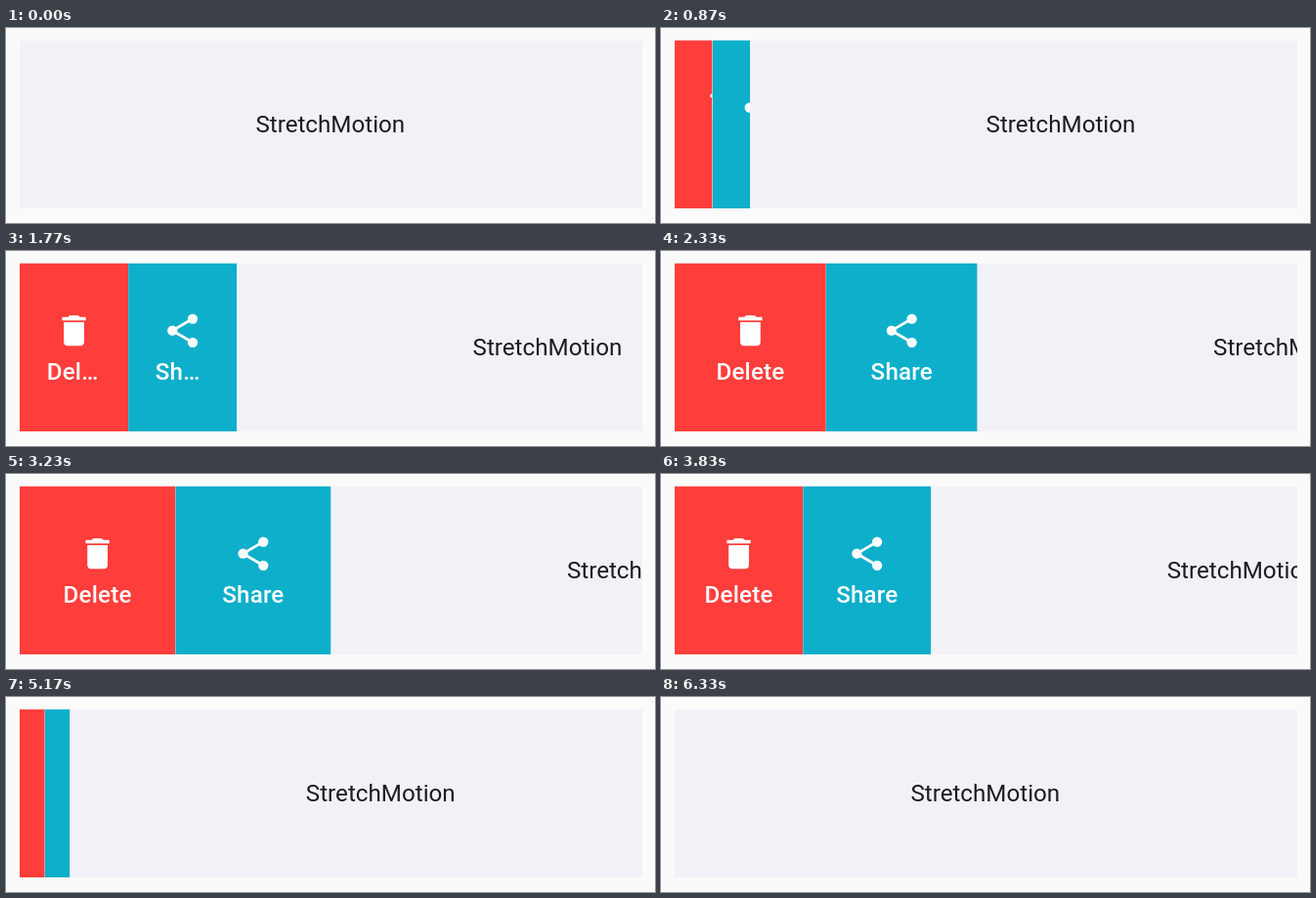
These frames come from a looping animation (664 by 200 pixels, 6.63 s). An HTML page with a canvas:

```html
<!DOCTYPE html>
<html lang="en">
<head>
<meta charset="utf-8">
<title>StretchMotion</title>
<style>
  html, body { margin: 0; width: 100%; height: 100%; overflow: hidden; background: #fafafa; }
  canvas { display: block; width: 664px; height: 200px; }
</style>
</head>
<body>
<canvas id="stage" width="664" height="200"></canvas>
<script>
const ctx = document.getElementById('stage').getContext('2d');
const LOOP = 6630;
const SCALE = 1.73;
const CARD = { x: 14, y: 12.4, w: 637, h: 172.7 };
const PADDING = 16 * SCALE;
const ICON_TOP = 60.9;
const ICON_SIZE = 24 * SCALE;
const LABEL_BASELINE = 131.7;
const TITLE_BASELINE = 107.3;
const FONT_SIZE = 24.2;

// Revealed width over time: [ms, px]
const REVEAL = [
  [570, 28.5], [870, 77], [1770, 222], [2330, 309.5], [2388, 318.5],
  [3467, 318.5], [3830, 262.5], [4470, 164.5], [5490, 0]
];

function revealAt(t) {
  if (t < REVEAL[0][0]) return 0;
  for (let i = 1; i < REVEAL.length; i++) {
    const [t0, v0] = REVEAL[i - 1];
    const [t1, v1] = REVEAL[i];
    if (t < t1) return v0 + (v1 - v0) * (t - t0) / (t1 - t0);
  }
  return 0;
}

const trashPath = new Path2D(
  'M6 19c0 1.1.9 2 2 2h8c1.1 0 2-.9 2-2V7H6v12zM19 4h-3.5l-1-1h-5l-1 1H5v2h14V4z');

function drawTrash() {
  ctx.fill(trashPath);
}

function drawShare() {
  ctx.lineWidth = 1.62;
  ctx.beginPath();
  ctx.moveTo(18, 5);
  ctx.lineTo(6, 12);
  ctx.lineTo(18, 19);
  ctx.stroke();
  for (const [x, y] of [[18, 5], [6, 12], [18, 19]]) {
    ctx.beginPath();
    ctx.arc(x, y, 2.97, 0, 2 * Math.PI);
    ctx.fill();
  }
}

const ACTIONS = [
  { label: 'Delete', color: '#ff3d3b', icon: drawTrash },
  { label: 'Share', color: '#0dafca', icon: drawShare }
];

function setFont(weight, spacing) {
  ctx.font = `${weight} ${FONT_SIZE}px Roboto, sans-serif`;
  ctx.letterSpacing = spacing + 'px';
}

function clipRect(x, y, w, h) {
  ctx.beginPath();
  ctx.rect(x, y, w, h);
  ctx.clip();
}

function drawLabel(label, x, width) {
  if (width <= 0) return;
  const fits = text => ctx.measureText(text).width <= width;
  ctx.save();
  if (fits(label)) {
    ctx.textAlign = 'center';
    ctx.fillText(label, x + width / 2, LABEL_BASELINE);
  } else {
    let length = label.length - 1;
    while (length > 0 && !fits(label.slice(0, length) + '…')) length--;
    clipRect(x, CARD.y, width, CARD.h);
    ctx.textAlign = 'left';
    ctx.fillText(label.slice(0, length) + '…', x, LABEL_BASELINE);
  }
  ctx.restore();
}

function drawAction(action, x, width) {
  ctx.save();
  clipRect(x, CARD.y, width, CARD.h);
  ctx.fillStyle = action.color;
  ctx.fillRect(x, CARD.y, width, CARD.h);
  ctx.fillStyle = ctx.strokeStyle = '#fff';

  const left = x + PADDING;
  const inner = Math.max(0, width - 2 * PADDING);
  setFont(500, 0.17);
  drawLabel(action.label, left, inner);

  // An icon wider than its slot stays aligned to the left
  ctx.translate(left + Math.max(0, (inner - ICON_SIZE) / 2), ICON_TOP);
  ctx.scale(SCALE, SCALE);
  action.icon();
  ctx.restore();
}

function draw(t) {
  const reveal = revealAt(t);
  ctx.fillStyle = '#fafafa';
  ctx.fillRect(0, 0, 664, 200);

  ctx.save();
  clipRect(CARD.x, CARD.y, CARD.w, CARD.h);
  ctx.fillStyle = '#f3f1f8';
  ctx.fillRect(CARD.x, CARD.y, CARD.w, CARD.h);
  ctx.fillStyle = '#1c1b20';
  setFont(400, 0);
  ctx.textAlign = 'center';
  ctx.fillText('StretchMotion', 331.8 + reveal, TITLE_BASELINE);
  ctx.restore();

  if (reveal > 0) {
    const width = reveal / ACTIONS.length;
    ACTIONS.forEach((action, i) => drawAction(action, CARD.x + i * width, width));
  }
}

const start = performance.now();
function tick() {
  draw((performance.now() - start) % LOOP);
  requestAnimationFrame(tick);
}
tick();
</script>
</body>
</html>
```
